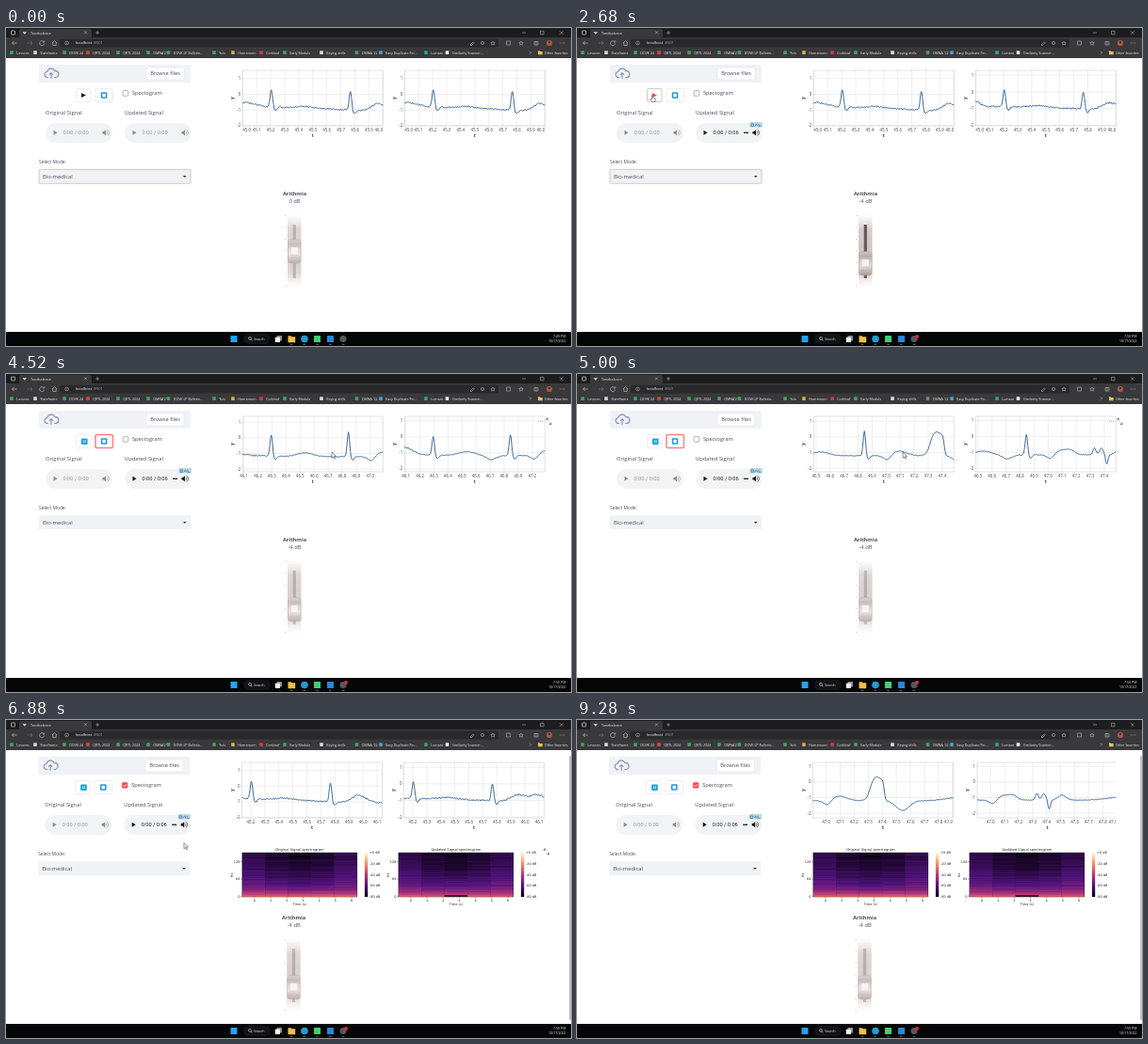
Recreate the animation shown at these times as an HTML page. Size 600 by 338 pixels, loop 9320 ms.

```html
<!DOCTYPE html>
<html lang="en">
<head>
<meta charset="utf-8">
<title>Tonebalance</title>
<style>
html, body { margin: 0; width: 100%; height: 100%; overflow: hidden; background: #fff; }
svg { display: block; width: 600px; height: 338px; }
text { font-family: "Open Sans", "Noto Sans", sans-serif; }
.plot { font-family: "DejaVu Sans", sans-serif; }
.time { font-family: Roboto, Arial, sans-serif; }
</style>
</head>
<body>
<svg id="stage" viewBox="0 0 600 338"></svg>
<script>
const LOOP = 9320, NS = 'http://www.w3.org/2000/svg';
const stage = document.getElementById('stage');

function el(tag, attrs, parent = stage, content) {
  const e = document.createElementNS(NS, tag);
  for (const k in attrs) e.setAttribute(k, attrs[k]);
  if (content !== undefined) e.textContent = content;
  parent.appendChild(e);
  return e;
}
const group = (parent, attrs = {}) => el('g', attrs, parent);
const rect = (p, x, y, width, height, fill, rx = 0, more = {}) =>
  el('rect', { x, y, width, height, fill, rx, ...more }, p);
const text = (p, x, y, s, size, fill, more = {}) =>
  el('text', { x, y, 'font-size': size, fill, ...more }, p, s);
const path = (p, d, stroke, width = .7, more = {}) =>
  el('path', { d, stroke, 'stroke-width': width, fill: 'none', ...more }, p);
const shape = (p, d, fill) => el('path', { d, fill }, p);
const dot = (p, cx, cy, r, fill) => el('circle', { cx, cy, r, fill }, p);
const ring = (p, cx, cy, r, stroke) => el('circle', { cx, cy, r, stroke, fill: 'none', 'stroke-width': .5 }, p);
const set = (e, attrs) => { for (const k in attrs) e.setAttribute(k, attrs[k]); };
const move = (e, x, y) => e.setAttribute('transform', `translate(${x},${y})`);
const show = (e, on) => e.setAttribute('visibility', on ? 'visible' : 'hidden');
const clamp = u => Math.min(1, Math.max(0, u));
const smooth = u => { u = clamp(u); return u * u * (3 - 2 * u); };
const lerp = (a, b, u) => a + (b - a) * u;
const noise = n => { const s = Math.sin(n * 127.1 + 3.7) * 43758.5453; return s - Math.floor(s) - .5; };
const MID = { 'text-anchor': 'middle' }, END = { 'text-anchor': 'end' }, BOLD = { ...MID, 'font-weight': 700 };

const defs = el('defs', {});
function gradient(id, stops) {
  const g = el('linearGradient', { id, x1: 0, y1: 0, x2: 0, y2: 1 }, defs);
  stops.forEach(([color, op = 1], i) => el('stop',
    { offset: i / (stops.length - 1), 'stop-color': color, 'stop-opacity': op }, g));
}

// ---- page ----
rect(stage, 0, 0, 600, 338, '#fff');
const page = group(stage);
const INK = '#4b4d57', PALE = '#f0f2f6', RED = '#ff4b4b', BLUE = '#1b9fda', LINE = '#dcdde2';

rect(page, 35, 39, 161, 19, PALE, 1.5);
path(page, 'M45 52.5h-.8a3 3 0 0 1-.3-6a4.2 4.2 0 0 1 8-.8a3.3 3.3 0 0 1 1 6.8h-1.7M48 54v-6M46 49.7l2-2 2 2', '#8291b3', 1.1);
rect(page, 149, 42, 40, 13, '#fff', 1.3, { stroke: LINE, 'stroke-width': .5 });
text(page, 169, 50.1, 'Browse files', 5.7, INK, MID);

const playBox = rect(page, 74.5, 64.5, 15.5, 14, '#fff', 1.3);
const stopBox = rect(page, 95, 64.5, 18.5, 14, '#fff', 1.3);
const playIcon = shape(page, 'M80 69v5l5-2.5z', '#222');
const pauseIcon = group(page);
rect(pauseIcon, 80, 68.5, 6.6, 6.6, BLUE, 1);
path(pauseIcon, 'M82.4 70.2v3.2M84.2 70.2v3.2', '#fff', .7);
rect(page, 100.8, 68.2, 6.6, 6.6, BLUE, 1);
rect(page, 102.4, 69.8, 3.4, 3.4, '#fff', .3);

const check = rect(page, 124.2, 66.6, 5.6, 5.6, '#fff', 1, { 'stroke-width': .7 });
const tick = path(page, 'M125.5 69.4l1.2 1.3 2-2.4', '#fff', .9);
text(page, 134, 71.3, 'Spectogram', 5.7, INK);
text(page, 42, 91.7, 'Original Signal', 5.8, INK);
text(page, 126, 91.7, 'Updated Signal', 5.8, INK);

function audio(x, label, live) {
  const g = group(page);
  rect(g, x, 101, 71, 21, '#f1f3f4', 10.5);
  const ink = group(g, { opacity: live ? 1 : .45 });
  shape(ink, `M${x + 8.5} 108.8v5l4-2.5z`, '#111');
  text(ink, x + 18.5, 113.3, label, 5.7, '#222', { class: 'time' });
  if (live) path(ink, `M${x + 51} 111.3h5`, '#111', 1.2);
  shape(ink, `M${x + 60.5} 110h1.5l2-1.8v6.2l-2-1.8h-1.5z`, '#111');
  path(ink, `M${x + 64.8} 109.7a2 2 0 0 1 0 3.2M${x + 65.5} 108.2a3.4 3.4 0 0 1 0 6.2`, '#111', .6);
  return g;
}
audio(42, '0:00 / 0:00', false);
const idle = audio(126, '0:00 / 0:00', false);
const ready = audio(126, '0:00 / 0:06', true);
const badge = group(ready);
rect(badge, 183.5, 100, 13.5, 5.6, '#b9dcec', .5);
path(badge, 'M185 104.3v-2.5h2.5v2.5zM189 104.3l1.5-2.5 1.2 2.5M193 101.5v2.8h2.5', '#356b86');

text(page, 35, 143.7, 'Select Mode:', 4.85, INK);
const select = rect(page, 35, 150.3, 161, 15, PALE, 1.3, { 'stroke-width': .6 });
text(page, 39, 159.7, 'Bio-medical', 5.8, INK);
shape(page, 'M187.9 157l1.9 2 1.9-2z', '#31333f');

// ---- gain slider ----
const gain = group(page);
text(gain, 306.5, 177.7, 'Arithmia', 5.7, INK, BOLD);
const gainText = text(gain, 306.5, 186.2, '', 5.8, INK, MID);
const fader = group(gain);
gradient('rail', [['#ded5d3', 0], ['#d8cdcb'], ['#d2c6c4'], ['#d2c6c4'], ['#d8cdcb'], ['#eee8e7', 0]]);
gradient('knob', [['#d3c8c7'], ['#b9adac'], ['#d9cfcd'], ['#e6dedc'], ['#c9bdbb'], ['#a99c9b']]);
for (let i = 0; i < 7; i++) path(fader, `M296 ${199.5 + i * 12.5}h1.8`, '#aaa', .5);
rect(fader, 299, 198, 14.5, 78, 'url(#rail)', 1);
const slot = rect(fader, 304.7, 209, 3.2, 57, '#625a5c', .5);
const knob = group(fader);
rect(knob, 299.5, -12.5, 13.6, 25, 'url(#knob)', 3, { stroke: '#aa9e9d', 'stroke-width': .5 });
rect(knob, 302.2, -4.5, 8.2, 8, '#f6f1f0', 1.2, { stroke: '#c3b7b5', 'stroke-width': .4 });
path(knob, 'M301 -7.5h10.6M301 7h10.6', '#b3a7a5', .5);

// ---- signals; c is hundredths of a second after 45 ----
const bell = (c, at, w, h) => h * Math.exp(-(((c - at) / w) ** 2));
const sum = (c, bells) => bells.reduce((s, b) => s + bell(c, ...b), 0);
const beats = (c, amp, gain) => [20.5, 76.8, 129.5, 184.5].reduce((s, at) =>
  s + bell(c, at, 1.25, amp + gain * (at / 185) ** 2) + bell(c, at + 2.8, 1.6, -.22) + bell(c, at + 24, 8, .08 + .0012 * at), 0);
const drift = c => smooth(c / 160);
const wide = c => 1.35 / (1 + Math.exp((231 - c) / 1.3)) / (1 + Math.exp((c - 241.4) / .5));
const grain = c => noise(c) * (c < 125 ? .1 : .04);

const raw = c => -.8 - .4 * drift(c) + beats(c, 1.12, .45) + wide(c) + grain(c)
  + sum(c, [[2, 10, .28], [96, 6, .35], [201, 4, -.35], [235.5, 3, .2], [254.5, 6.5, -.62], [296, 14, .22]]);
const filtered = c => -.86 - .3 * drift(c) + beats(c, 1, .3) + grain(c + 7)
  + sum(c, [[0, 4, .32], [94, 6, .3], [110, 7, .38], [171, 5, -.25], [202, 4, -.35], [216, 4, .22],
    [233, 1.5, .42], [238, 2, .42], [241.8, 1.2, -.6], [251, 4, .32], [294, 14, .2]]);

function clip(x, y, w, h) {
  const id = 'clip' + defs.childElementCount;
  rect(el('clipPath', { id }, defs), x, y, w, h, '#000');
  return { 'clip-path': `url(#${id})` };
}
function makeChart(x0, right) {
  const g = group(group(page, clip(x0 - 14, 40, right - x0 + 14, 80)));
  const grid = path(g, '', '#dedede', .5);
  path(g, `M${x0} 45h149v59h-149z`, '#c4c4c4', .5);
  const line = path(g, '', '#36649a', .95, { 'stroke-linejoin': 'round', ...clip(x0, 44.5, 149, 60) });
  const xs = Array.from({ length: 11 }, () => text(g, 0, 110.2, '', 4.4, '#444'));
  const ys = [1, 0, -1, -2].map(v => text(g, x0 - 2, 0, v, 4.4, '#444', END));
  text(g, x0 + 74.5, 116.3, 't', 4.4, '#333', BOLD);
  text(g, 0, 0, 'y', 4.4, '#333', { ...BOLD, transform: `translate(${x0 - 9},74.5) rotate(-90)` });

  return (signal, left, zero, unit, dx) => {
    move(g, dx, 0);
    const px = c => x0 + (c / 100 - left + 45) * 149;
    let d = '', k = Math.ceil(left * 10 - 1e-6);
    for (const label of xs) {
      const x = px(k * 10 - 4500), on = x <= x0 + 149.01;
      show(label, on);
      if (on) {
        d += `M${x} 45v61`;
        label.textContent = (k / 10).toFixed(1);
        set(label, { x, 'text-anchor': x - x0 < .8 ? 'start' : x0 + 149 - x < .8 ? 'end' : 'middle' });
      }
      k++;
    }
    ys.forEach((label, i) => {
      const y = zero - (1 - i) * unit, on = y > 45 && y < 104.8;
      show(label, on);
      if (on) { d += `M${x0 - 1.5} ${y}h150.5`; set(label, { y: y + 1.5 }); }
    });
    set(grid, { d });
    const first = Math.floor((left - 45) * 100) - 1, points = [];
    for (let c = first; c < first + 104; c += .5)
      points.push(px(c).toFixed(2) + ' ' + (zero - signal(c) * unit).toFixed(2));
    set(line, { d: 'M' + points.join('L') });
  };
}
const drawRaw = makeChart(251.3, 405);
const drawNew = makeChart(423.3, 573);

// ---- spectrograms ----
const magma = [[0, 0, 4], [81, 18, 124], [183, 55, 121], [252, 137, 97], [252, 253, 191]];
function heat(v) {
  const p = Math.min(.999, Math.max(0, v)) * 4, i = Math.floor(p);
  return `rgb(${magma[i].map((a, n) => Math.round(lerp(a, magma[i + 1][n], p - i)))})`;
}
gradient('scale', magma.map(c => [`rgb(${c})`]).reverse());
const spectra = group(page);
function spectrogram(x, title, seed, notch) {
  const label = (lx, y, s, more = {}) => text(spectra, lx, y, s, 3.5, '#222', { class: 'plot', ...more });
  rect(spectra, x, 141, 122, 47, heat(.2));
  for (let r = 0; r < 47; r++) for (let c = 0; c < 5; c++) {
    const p = r / 46, shade = (.03 - .09 * Math.sin(c * Math.PI / 4)) * (1 - p ** 3);
    const v = .11 + .26 * p ** 1.5 + .3 * p ** 10 + shade + noise(r * 5 + c + seed) * .04 + noise(r + seed) * .04;
    rect(spectra, x + c * 24.4, 141 + r, 24.45, 1.05, heat(v));
  }
  if (notch) rect(spectra, x + 48.8, 186.3, 24.4, 1.5, heat(.03));
  rect(spectra, x, 141, 122, 47, 'none', 0, { stroke: '#222', 'stroke-width': .4 });
  label(x + 61, 139, title, { ...MID, 'font-size': 3.7 });
  [128, 64, 0].forEach((n, i) => {
    label(x - 2.5, 151.8 + i * 18.4, n, END);
    path(spectra, `M${x - 1.5} ${150.6 + i * 18.4}h1.5`, '#222', .4);
  });
  for (let i = 0; i < 7; i++) {
    label(x + 13 + i * 17.2, 192.8, i, MID);
    path(spectra, `M${x + 13 + i * 17.2} 188v1.3`, '#222', .4);
  }
  label(x + 61, 196.7, 'Time (s)', MID);
  label(0, 0, 'Hz', { ...MID, transform: `translate(${x - 10},165) rotate(-90)` });
  rect(spectra, x + 130, 141, 3.3, 47, 'url(#scale)');
  for (let i = 0; i < 5; i++) label(x + 135, 142.4 + i * 11.6, (i ? -20 * i : '+0') + ' dB');
}
spectrogram(251.7, 'Original Signal spectrogram', 11, false);
spectrogram(417.7, 'Updated Signal spectrogram', 501, true);

const dots = path(page, 'M565 50.2h5', '#999', .8, { 'stroke-dasharray': '1 1' });
const expand = path(page, 'M-2.5 1.5v-2h2M-2.5 -.5l2 2M2.5 3.5v2h-2M2.5 5.5l-2-2', '#444', .6);
const bar = rect(stage, 598.3, 38, 1.4, 281, '#aaa', .7);

// ---- browser frame ----
const GREY = '#c9c9cb', CHROME = '#39393c';
const STAR = 'l.7 1.4 1.5.2-1.1 1 .3 1.5-1.4-.7-1.4.7.3-1.5-1.1-1 1.5-.2z';
rect(stage, 0, 0, 600, 11, '#1d1d1f');
rect(stage, 14, 1, 77, 10, CHROME, 2);
rect(stage, 0, 10, 600, 22, CHROME);
rect(stage, 57, 11.7, 466, 8.8, '#29292b', 2);
rect(stage, 5.5, 3, 4, 4, 'none', .6, { stroke: '#ddd', 'stroke-width': .7 });
shape(stage, 'M17.5 4.3h4.5l-2.2 2.5z', '#ddd');
text(stage, 26, 6.6, 'Tonebalance', 3.7, '#eee');
path(stage, 'M83 3.3l3 3m0-3l-3 3M95 5h4m-2-2v4M548 5h4M567.5 3.3h3.5v3.5h-3.5zM588 3.3l3.5 3.5m0-3.5l-3.5 3.5', GREY, .5);
path(stage, 'M11.5 16h-5m2-2l-2 2 2 2M40 14.5a2.5 2.5 0 1 0 .6 2M40.8 13.5v1.5h-1.6M49 16l2.5-2.3 2.5 2.3M49.8 15.5v3h3.4v-3', GREY, .6);
path(stage, 'M23 16h5m-2-2l2 2-2 2', '#77777a', .6);
ring(stage, 64.5, 16, 1.9, GREY);
ring(stage, 506, 16, 1.6, GREY);
text(stage, 74, 17.4, 'localhost', 4.1, '#fff');
text(stage, 92.5, 17.4, ':8501', 4.1, '#a0a0a2');
path(stage, `M64.5 15.6v1.5M493 18l3.2-3.2 1 1-3.2 3.2zM517 14${STAR}M547 14${STAR}M531.5 14h4v4h-4zM561 14.5h4v3.500h-4zM563 14.5v3.5`, GREY, .5);
dot(stage, 577, 16, 3.1, '#a9583f');
dot(stage, 577, 15, 1.1, '#3a2523');
path(stage, 'M588 16h.7M590 16h.7M592 16h.7', GREY, .8);

const marks = [
  [6, 'Lessons'], [31, 'Slateframe', '#d9d9d9'], [62, 'DOVK 24'], [87, 'QRTL 2024', '#d8463a'], [119, 'QRTL 2024'],
  [151, 'OMNA\'21'], [172.5, 'DOVK LP Bulletin...'], [221, 'Yuls'], [241, 'Homeroom', '#d9b13b'], [271, 'Corkleaf', '#d23b3b'],
  [296, 'Early Module'], [335, 'Keying drills', '#ddd'], [372.5, 'OMNA \'22'], [398, 'Easy Duplicate Fin...', '#4ba2d2'],
  [446, 'Lumaro', '#2ba58c'], [468.5, 'Similarity Scanner...', '#eee']
];
for (const [x, name, color = '#45a35a'] of marks) {
  rect(stage, x - 1.8, 24.3, 3.6, 3.6, color, .4);
  text(stage, x + 5.3, 27.5, name, 3.6, '#f0f0f0');
}
path(stage, 'M556 24.5l1.6 1.6-1.6 1.6', GREY, .6);
shape(stage, 'M565 24.3h1.6l.6.7h2.5v3.3h-4.7z', '#e9c35c');
text(stage, 572, 27.5, 'Other favorites', 3.5, '#f0f0f0');

// ---- taskbar ----
rect(stage, 0, 323, 600, 15, '#050608');
rect(stage, 252, 325, 29, 11, '#121418', 5.5);
ring(stage, 259, 329.9, 1.5, '#eee');
path(stage, 'M260 331l1.3 1.4', '#eee', .6);
text(stage, 263, 331.9, 'Search', 3.7, '#e6e6e6');
rect(stage, 287.5, 327, 5.5, 5.5, '#8c8f94', .5);
rect(stage, 285.8, 328.7, 5.2, 5.2, '#f2f2f2', .5);
shape(stage, 'M299.500 327.2h3l1 1h3.7v6h-7.7z', '#f0c04a');
rect(stage, 238.5, 327, 7, 7, '#1fa5ee', .5);
rect(stage, 327, 327, 7, 7, '#3fcf74', .5);
rect(stage, 341, 327, 7, 7, '#2489d6', .5);
dot(stage, 317, 330.5, 3.8, '#249bd0');
dot(stage, 358, 330.5, 3.5, '#56585c');
const recDot = dot(stage, 361, 328, 2, '#e62a2a');
for (let i = 0; i < 5; i++) path(stage, `M${301.7 + i * 13.75} 336.3h2.6`, '#8b9298');
const clock = text(stage, 594.5, 329.2, '', 3.6, '#eee', END);
text(stage, 594.5, 334.3, '10/17/2022', 3.5, '#eee', END);

// ---- pointer ----
const OUTLINE = { fill: '#fff' };
const arrow = path(stage, 'M0 0v6.3l1.5-1.3 1 2.2 1-.4-1-2.2h2z', '#222', .5, OUTLINE);
const hand = path(stage, 'M-.6.2a.6.6 0 0 1 1.2 0v2.5l2.2.5q.7.2.6 1l-.4 2.600h-3.4l-2-2.600q.4-.8 1.8.2z', '#222', .5, OUTLINE);

// each move: start, end, x, y; the pointer rests in between
const moves = [
  [40, 520, 306, 238], [600, 1080, 306, 250], [2000, 2360, 80, 71.5], [3240, 3560, 104, 72], [3760, 4440, 346, 83],
  [5320, 6120, 127, 71], [6400, 6800, 189, 130.5], [6960, 7720, 349, 62.5], [8120, 8960, 560, 180], [8960, 9240, 604, 300]
];
function pointerAt(t) {
  let x = 358, y = 340;
  for (const [a, b, tx, ty] of moves) {
    const u = smooth((t - a) / (b - a));
    x = lerp(x, tx, u);
    y = lerp(y, ty, u);
  }
  return [x, y];
}
const ramp = (t, a, b) => clamp((t - a) / (b - a));

function render(t) {
  const within = (a, b) => t >= a && t < b;
  const updated = t >= 1400, playing = t >= 3200, checked = t >= 6320, tall = t >= 6480;

  const db = -4 * smooth(ramp(t, 600, 1080)), active = within(480, 3200);
  gainText.textContent = (Math.round(db) || 0) + ' dB';
  move(knob, 0, 237.5 - db * 3.2);
  set(fader, { opacity: active ? 1 : .8 });
  set(slot, { opacity: active ? 1 : .4 });
  move(gain, 0, tall ? 34 : 0);
  move(page, tall ? -.8 : 0, 0);
  show(spectra, tall);
  show(bar, tall);

  const s = tall ? 1.905 * ramp(t, 6800, 7930) : 1.09 * ramp(t, 3200, 4520) + .85 * ramp(t, 4520, 5560);
  drawRaw(raw, 45 + s, 70.5 - 2.5 * s, 16.7, 0);
  if (updated) drawNew(filtered, 45 + s, 68 - 1.1 * s, 17.8 - .65 * s, tall && s > 1.5 ? 2.5 : 0);
  else drawNew(raw, 45, 70.5, 16.7, 0);

  show(idle, !updated);
  show(ready, updated);
  set(badge, { visibility: updated ? 'inherit' : 'hidden', opacity: within(6040, 6480) ? .55 : 1 });

  const pressed = within(2640, 3200);
  const border = on => ({ stroke: on ? '#ff8080' : LINE, 'stroke-width': on ? 1.5 : .5 });
  set(playBox, pressed ? { stroke: '#b9a5a5', 'stroke-width': .6 } : border(within(3200, 3680)));
  set(stopBox, border(within(3680, 6480)));
  show(playIcon, !playing);
  show(pauseIcon, playing);
  set(playIcon, { fill: pressed ? RED : '#222' });
  set(select, { stroke: playing ? 'none' : '#d99a9a' });
  set(check, { fill: checked ? RED : '#fff', stroke: checked ? RED : '#8f9198' });
  show(tick, checked);

  const hover = within(4120, 5600);
  show(dots, hover);
  show(expand, hover || within(6560, 8960));
  move(expand, hover ? 576.5 : 574.8, within(6560, 7200) ? 137.5 : 48);

  const [x, y] = pointerAt(t), seen = within(40, 9240);
  const overButton = within(2320, 3840) || within(6080, 6440);
  move(arrow, x, y);
  move(hand, x, y);
  show(arrow, seen && !overButton);
  show(hand, seen && overButton);

  clock.textContent = t < 600 ? '7:49 PM' : '7:50 PM';
  show(recDot, t >= 600);
}

const start = performance.now();
function frame(now) {
  render(Math.max(0, now - start) % LOOP);
  requestAnimationFrame(frame);
}
render(0);
requestAnimationFrame(frame);
</script>
</body>
</html>
```
